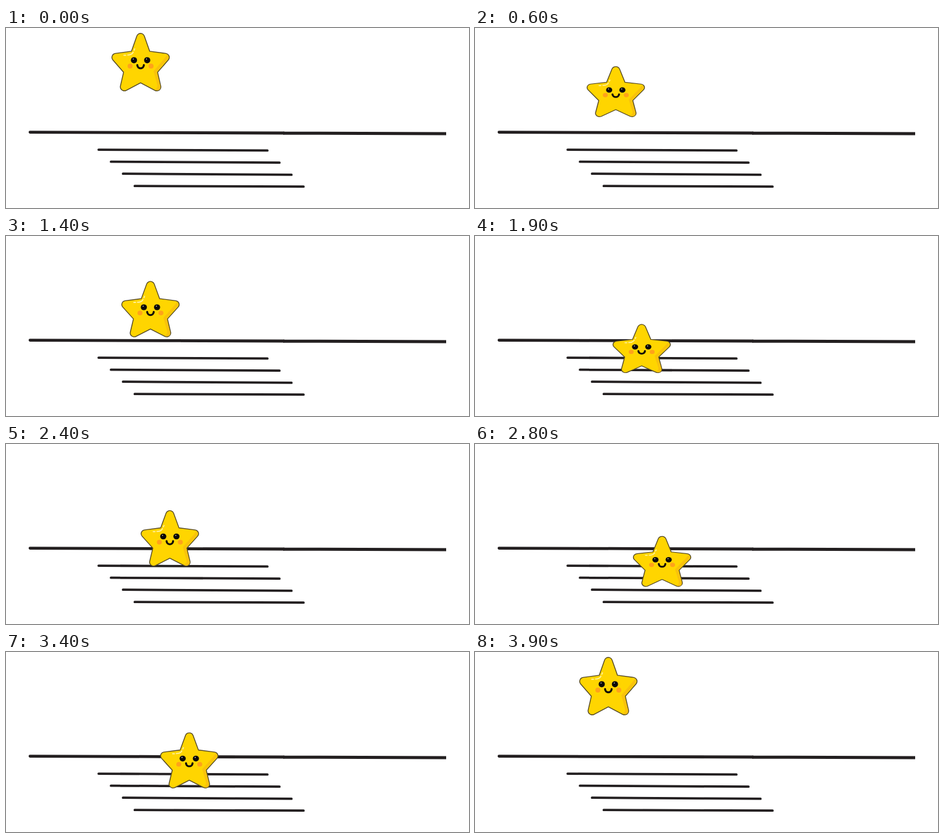
Recreate the animation shown at these times as an HTML page. Size 750x293 px, loop 4000 ms.

```html
<!DOCTYPE html>
<html lang="en">
<head>
<meta charset="utf-8">
<title>Bouncing star</title>
<style>
  html, body { margin: 0; width: 100%; height: 100%; overflow: hidden; background: #fff; }
  svg { display: block; width: 100vw; height: 100vh; }
</style>
</head>
<body>
<svg viewBox="0 0 750 293">
  <g stroke="#231f20" stroke-width="3.8" stroke-linecap="round" fill="none">
    <path d="M39 169.6L450 171" stroke-width="4.8"/>
    <path d="M449 171.2L713 171.9" stroke-width="5" stroke-linecap="butt"/>
    <path d="M150 198.1L423.5 199.4M170 217.7L443 219.2M189.5 237.2L462.5 238.9M208.5 257.2L482 258.2"/>
  </g>
  <g id="star">
    <defs>
      <path id="body" stroke-linejoin="round"
        d="M0-40L10-11.500L40-7.500L20.500 15L26.300 40.500L0 26.500L-26.300 40.500L-20.500 15L-40-7.500L-10-11.500Z"/>
    </defs>
    <use href="#body" fill="#544824" stroke="#544824" stroke-width="14.400"/>
    <use href="#body" fill="#ffd500" stroke="#ffd500" stroke-width="11.600"/>
    <path d="M43-11.500Q46-8 43-4L26 16L32 39Q33 45 28 46Q25 46 23 44Q28 43 27 37L21 15L38-5Q41-9 43-11.500Z" fill="#f9c20c"/>
    <g fill="none" stroke="#fff3a6" stroke-width="1.700" stroke-linecap="round">
      <path d="M-27-11H-24M-21-11.300Q-14-11.500-12-16"/>
      <path d="M-10.500-19L-9.500-21.500"/>
    </g>
    <g fill="#ffa21a">
      <circle cx="-17" cy="6.800" r="4"/>
      <circle cx="17" cy="6.800" r="4"/>
    </g>
    <g fill="#0c0a08">
      <circle cx="-10.700" cy="-2.900" r="5"/>
      <circle cx="10.700" cy="-2.900" r="5"/>
    </g>
    <g fill="#fff">
      <circle cx="-11.800" cy="-4.800" r=".8"/>
      <circle cx="9.600" cy="-4.800" r=".8"/>
    </g>
    <path d="M-5.300 5C-4.800 12 4.800 12 5.300 5" fill="none" stroke="#0c0a08" stroke-width="3.200" stroke-linecap="round"/>
  </g>
</svg>
<script>
const LOOP = 4000, STEP = 100, HEIGHT = 94;
const star = document.getElementById('star');

// Alternating peaks and landings: time, centre x, centre y, height
const keys = [
  [0, 218, 55.3, 94],
  [800, 234, 132, 78],
  [1500, 234, 114.3, 91],
  [1900, 270, 183, 79],
  [2500, 263.5, 141, 91],
  [2900, 326.5, 220.5, 79],
  [3900, 216, 55.3, 94],
  [4000, 216, 55.3, 94]
];

const mix = (a, b, k) => a + (b - a) * k;

function pose(t) {
  const i = keys.findIndex((k, n) => n > 0 && t < k[0]);
  const [t0, x0, y0, h0] = keys[i - 1];
  const [t1, x1, y1, h1] = keys[i];
  const u = (t - t0) / (t1 - t0);
  const falling = y1 > y0;
  const move = Math.pow(u, falling ? 1.62 : 1.9);
  const squash = falling ? u : 1 - (1 - u) ** 2;
  return { x: mix(x0, x1, move), y: mix(y0, y1, move), h: mix(h0, h1, squash) };
}

function draw(t) {
  const { x, y, h } = pose(t);
  star.setAttribute('transform', `translate(${x} ${y}) scale(1 ${h / HEIGHT})`);
}

let start;
function tick(now) {
  start ??= now;
  const t = (now - start) % LOOP;
  draw(Math.floor(t / STEP) * STEP);
  requestAnimationFrame(tick);
}

draw(0);
requestAnimationFrame(tick);
</script>
</body>
</html>
```
